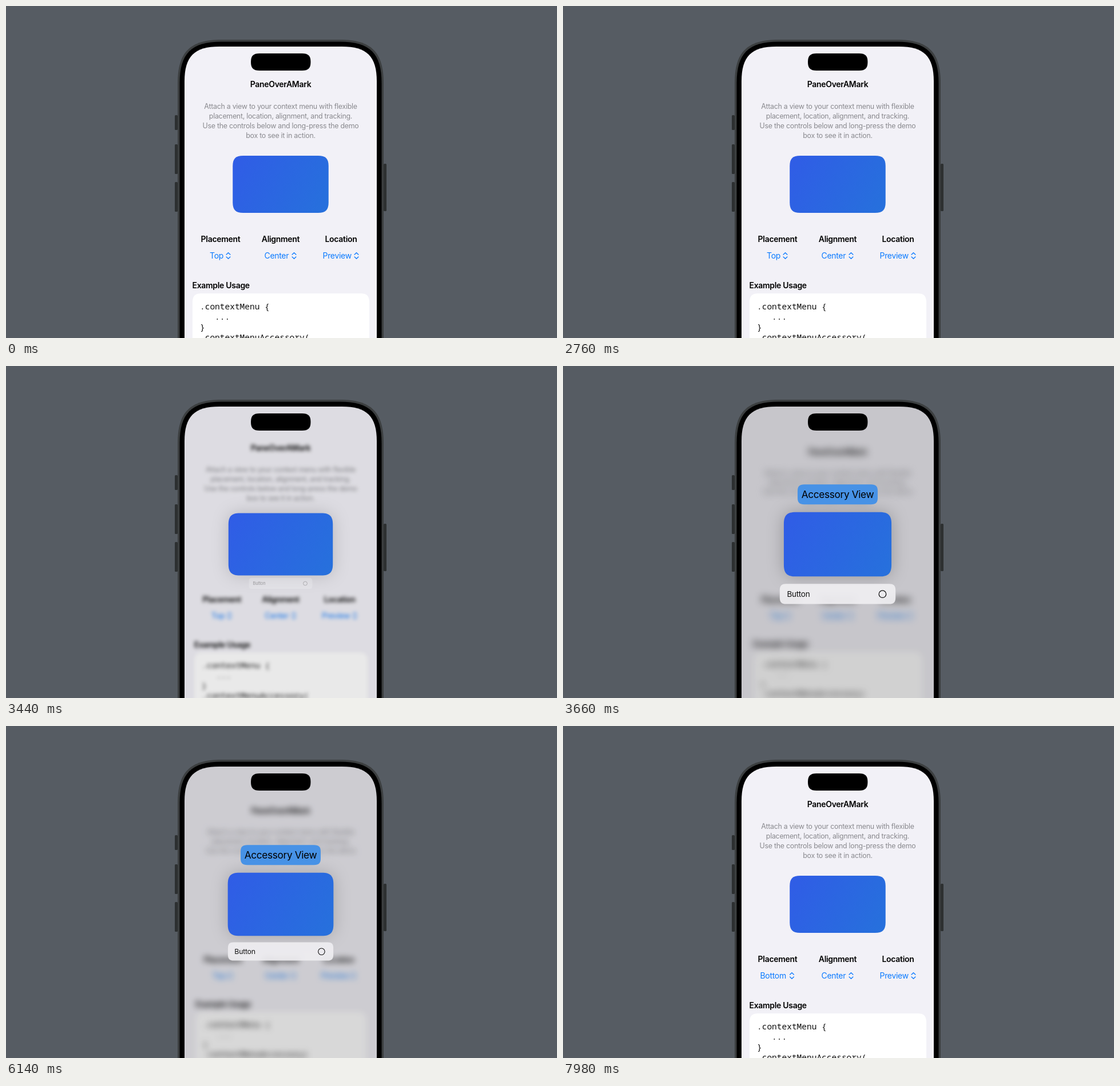
Recreate the animation shown at these times as an HTML page with a canvas. Size 963 px wide and 581 px high, loop 8 s.

```html
<!DOCTYPE html>
<html lang="en">
<head>
<meta charset="utf-8">
<title>Context menu demo</title>
<style>
  html, body { margin: 0; width: 100%; height: 100%; overflow: hidden; background: #565c63; }
  canvas { display: block; }
</style>
</head>
<body>
<canvas id="stage" width="963" height="581"></canvas>
<script>
const LOOP = 8000;
const PRESS = 2760, OPEN = 3380, CLOSE = 6140, SWITCH = 7720;
const SANS = 'Inter, "Open Sans", sans-serif';
const MONO = '"Noto Sans Mono", "DejaVu Sans Mono", monospace';
const BLUE = '#0a7aff';
const CENTER_X = 480, PAGE_CENTER_Y = 435, BOX_CENTER_Y = 312;

const stage = document.getElementById('stage').getContext('2d');
const clamp = v => Math.max(0, Math.min(1, v));
const mix = (a, b, k) => a + (b - a) * k;
const smooth = k => k * k * (3 - 2 * k);
const spring = x => x <= 0 ? 0 : 1 - Math.exp(-x) * (1 + x);

// Rounded rectangle with continuous-curvature corners.
function squircle(c, x, y, w, h, r) {
  const e = Math.min(1.3 * r, w / 2, h / 2), d = e * 0.28;
  const R = x + w, B = y + h;
  c.beginPath();
  c.moveTo(x + e, y);
  c.lineTo(R - e, y);
  c.bezierCurveTo(R - d, y, R, y + d, R, y + e);
  c.lineTo(R, B - e);
  c.bezierCurveTo(R, B - d, R - d, B, R - e, B);
  c.lineTo(x + e, B);
  c.bezierCurveTo(x + d, B, x, B - d, x, B - e);
  c.lineTo(x, y + e);
  c.bezierCurveTo(x, y + d, x + d, y, x + e, y);
  c.closePath();
}

function panel(c, x, y, w, h, r, color) {
  squircle(c, x, y, w, h, r);
  c.fillStyle = color;
  c.fill();
}

function text(c, str, x, y, { size = 14, weight = 400, color = '#000', align = 'center' } = {}) {
  c.font = `${weight} ${size}px ${SANS}`;
  c.letterSpacing = `${-0.022 * size}px`;
  c.textAlign = align;
  c.fillStyle = color;
  c.fillText(str, x, y);
}

function chevrons(c, x, y) {
  c.beginPath();
  for (const dir of [-1, 1]) {
    c.moveTo(x - 3.4, y + dir * 2);
    c.lineTo(x, y + dir * 5.3);
    c.lineTo(x + 3.4, y + dir * 2);
  }
  c.strokeStyle = BLUE;
  c.lineWidth = 1.3;
  c.lineCap = c.lineJoin = 'round';
  c.stroke();
}

function picker(c, title, titleX, value, valueX, chevronX) {
  text(c, title, titleX, 413, { weight: 600 });
  text(c, value, valueX, 442, { color: BLUE, align: 'left' });
  chevrons(c, chevronX, 437);
}

function makePage(placement, placementX, chevronX) {
  const page = document.createElement('canvas');
  page.width = 963;
  page.height = 640;
  const c = page.getContext('2d');
  text(c, 'PaneOverAMark', CENTER_X, 141.5, { weight: 600 });
  [
    'Attach a view to your context menu with flexible',
    'placement, location, alignment, and tracking.',
    'Use the controls below and long-press the demo',
    'box to see it in action.'
  ].forEach((line, i) => text(c, line, CENTER_X, 180.3 + i * 16.8, { size: 12.4, color: '#8a8a8f' }));

  picker(c, 'Placement', 375, placement, placementX, chevronX);
  picker(c, 'Alignment', 480, 'Center', 451.5, 503.5);
  picker(c, 'Location', 585.5, 'Preview', 553.5, 612.5);

  text(c, 'Example Usage', 325.5, 493.5, { weight: 600, align: 'left' });
  panel(c, 326, 503, 309, 160, 12, '#fff');
  c.font = `400 14.5px ${MONO}`;
  c.letterSpacing = '0px';
  c.textAlign = 'left';
  c.fillStyle = '#111';
  ['.contextMenu {', '   ...', '}', '.contextMenuAccessory(']
    .forEach((line, i) => c.fillText(line, 339, 530.5 + i * 18.1));
  return page;
}

const pages = {
  top: makePage('Top', 356, 388.5),
  bottom: makePage('Bottom', 344.5, 400)
};

// depth: backdrop blur and dimming, lift: box growth, menu: menu reveal.
function pose(t) {
  if (t < PRESS) return { depth: 0, lift: 0, menu: 0 };
  if (t < OPEN) {
    const k = (t - PRESS) / (OPEN - PRESS);
    return { depth: 0.253 * k * k, lift: 0.6 * smooth(k), menu: 0 };
  }
  if (t < CLOSE) {
    const k = spring((t - OPEN) * 0.017);
    return { depth: mix(0.253, 1, k), lift: mix(0.6, 1, k), menu: k };
  }
  const k = 1 - spring(0.75 + (t - CLOSE) * 0.025);
  return { depth: clamp(k * 1.03 - 0.03), lift: k, menu: k };
}

function drawBody(c) {
  c.fillStyle = '#2d3031';
  for (const [x, y, h] of [[295, 191, 26], [295, 242, 52], [295, 308, 52], [660, 276, 83]]) {
    c.beginPath();
    c.roundRect(x, y, 5, h, 1.5);
    c.fill();
  }
  panel(c, 300, 59, 360, 800, 59, '#3c3f40');
  panel(c, 303.5, 62.5, 353, 800, 56, '#000');
}

function drawScreen(c, page, depth) {
  c.save();
  squircle(c, 312, 71, 336, 800, 47);
  c.clip();
  c.fillStyle = '#f2f1f7';
  c.fillRect(312, 71, 336, 510);
  c.save();
  const scale = 1 - 0.047 * depth;
  c.translate(CENTER_X, PAGE_CENTER_Y);
  c.scale(scale, scale);
  c.translate(-CENTER_X, -PAGE_CENTER_Y);
  if (depth > 0.01) c.filter = `blur(${6.5 * depth}px)`;
  c.drawImage(page, 0, 0);
  c.restore();
  c.fillStyle = `rgba(0,0,0,${0.187 * depth})`;
  c.fillRect(312, 71, 336, 510);
  c.restore();
}

function drawBox(c, lift) {
  const w = mix(167.5, 188.5, lift), h = mix(100, 113, lift);
  const x = CENTER_X - w / 2, y = BOX_CENTER_Y - h / 2;
  const fill = c.createLinearGradient(x, y, x + w, y + h);
  fill.addColorStop(0, '#305ce6');
  fill.addColorStop(1, '#2671dc');
  c.save();
  c.shadowColor = `rgba(0,0,0,${0.25 * lift})`;
  c.shadowBlur = 30;
  panel(c, x, y, w, h, 14 * w / 167.5, fill);
  c.restore();
  return { top: y, bottom: y + h };
}

function drawAccessory(c, boxTop, alpha) {
  if (alpha <= 0) return;
  const y = boxTop - 48.5;
  c.save();
  c.globalAlpha = alpha;
  panel(c, 410, y, 140, 35, 9, '#4792e6');
  text(c, 'Accessory View', CENTER_X, y + 24, { size: 17.3 });
  c.restore();
}

function drawMenu(c, boxBottom, reveal) {
  if (reveal < 0.01) return;
  const scale = mix(0.35, 1, reveal);
  c.save();
  c.globalAlpha = clamp(reveal * 1.2);
  c.translate(CENTER_X, boxBottom + 13.5 - (1 - scale) * 20);
  c.scale(scale, scale);
  panel(c, -104.5, 0, 209, 36.5, 9, 'rgba(239,238,241,0.93)');
  text(c, 'Button', -91.5, 23.5, { color: '#111', align: 'left' });
  c.beginPath();
  c.arc(81, 18.5, 6.5, 0, Math.PI * 2);
  c.strokeStyle = '#111';
  c.lineWidth = 1.3;
  c.stroke();
  c.restore();
}

function render(now) {
  const t = now % LOOP;
  const { depth, lift, menu } = pose(t);
  stage.fillStyle = '#565c63';
  stage.fillRect(0, 0, 963, 581);
  drawBody(stage);
  drawScreen(stage, t < SWITCH ? pages.top : pages.bottom, depth);
  panel(stage, 428, 83, 104.5, 30, 15, '#000');
  const box = drawBox(stage, lift);
  drawAccessory(stage, box.top, clamp((menu - 0.3) / 0.5));
  drawMenu(stage, box.bottom, menu);
  requestAnimationFrame(() => render(performance.now()));
}

render(performance.now());
</script>
</body>
</html>
```
